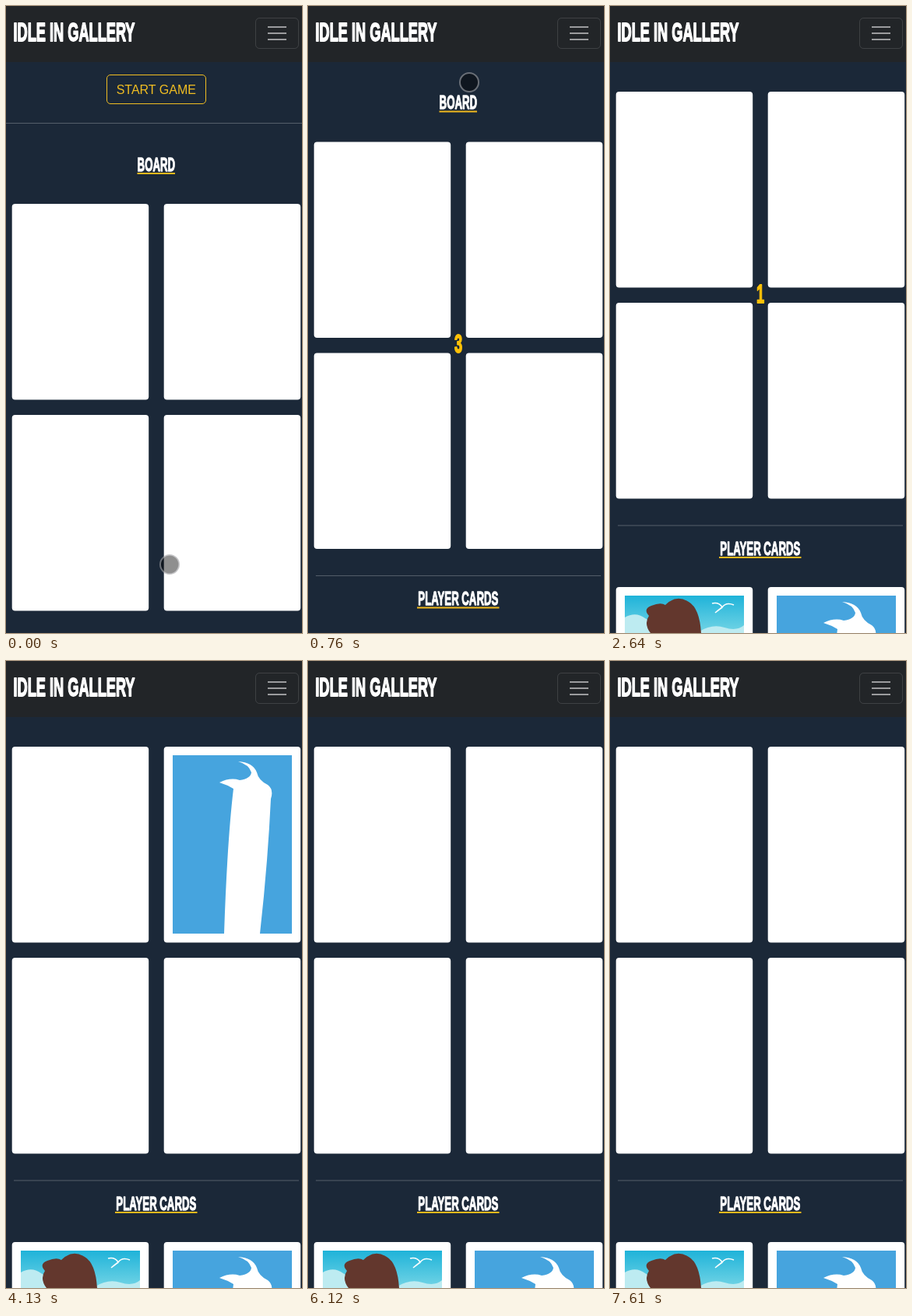
Write an HTML page that moves like this. It is 380x805 px and loops after 8 s.

```html
<!DOCTYPE html>
<html lang="en">
<head>
<meta charset="utf-8">
<title>Card game</title>
<style>
  html, body { margin: 0; width: 100%; height: 100%; overflow: hidden; background: #1b2838; }
  svg { display: block; width: 100vw; height: 100vh; }
  text { font-family: "Liberation Sans", Arial, sans-serif; }
  .head { font-weight: 700; stroke-width: .055em; stroke-linejoin: round; }
  .white { fill: #fff; stroke: #fff; }
  .gold { fill: #ffc107; stroke: #ffc107; }
</style>
</head>
<body>
<svg viewBox="0 0 380 805">
  <defs>
    <linearGradient id="sky" x1="0" y1="0" x2="0" y2="1">
      <stop offset="0" stop-color="#1fb3d9"/>
      <stop offset=".2" stop-color="#6fd3e5"/>
      <stop offset="1" stop-color="#b4e8ee"/>
    </linearGradient>
    <clipPath id="crop"><rect width="153" height="229"/></clipPath>
    <g id="sea" clip-path="url(#crop)">
      <rect width="153" height="229" fill="url(#sky)"/>
      <path d="M0 28Q14 20 26 29T54 34V60H0ZM96 46Q112 36 128 41T153 38V60H96Z" fill="#bdebf1"/>
      <path d="M33 48Q24 36 31 26Q23 17 34 13Q46 8 52 12Q66-2 82 8Q96 16 98 48Q108 120 96 229H28Q22 110 33 48Z" fill="#63372d"/>
      <path d="M112 10Q121 8 125 15Q130 8 140 12M116 22Q121 18 125 15" fill="none" stroke="#fff" stroke-width="1.6"/>
    </g>
    <g id="ink" clip-path="url(#crop)">
      <rect width="153" height="229" fill="#46a4de"/>
      <path d="M60 35Q74 28 86 32Q100 30 101 22Q98 12 84 8Q103 9 108 22Q110 32 122 38Q130 44 126 56Q122 140 112 229H66Q70 110 78 43Q70 38 60 35Z" fill="#fff"/>
    </g>
  </defs>

  <rect width="380" height="805" fill="#1b2838"/>
  <g id="page">
    <rect x="129.5" y="88.5" width="127" height="37" rx="4.5" fill="none" stroke="#f0bd22"/>
    <text x="192.8" y="112.5" font-size="16" text-anchor="middle" fill="#f0bd22">START GAME</text>
    <path d="M0 150.5H380M10 811H376" stroke="#fff" stroke-opacity=".25"/>
    <g id="titles"></g>
    <path d="M168.5 215H217M140 852H245.5" stroke="#f2b91c" stroke-width="2"/>
    <g id="cards" fill="#fff"></g>
    <g id="flashes"></g>
    <use href="#sea" x="19" y="901"/>
    <use href="#ink" x="214" y="901"/>
    <g id="counter"></g>
  </g>

  <g id="bar">
    <rect width="380" height="72" fill="#222528"/>
    <rect x="320.5" y="15.5" width="55" height="39" rx="5" fill="none" stroke="#fff" stroke-opacity=".13"/>
    <path d="M336 27H360M336 35H360M336 43H360" stroke="#fff" stroke-opacity=".55" stroke-width="2"/>
  </g>

  <g id="dot">
    <circle r="11.5" fill="#000" fill-opacity=".44"/>
    <circle r="12" fill="none" stroke="#a0a0a4" stroke-opacity=".6" stroke-width="2"/>
  </g>
</svg>
<script>
const NS = "http://www.w3.org/2000/svg";
const LOOP = 8000, STEP = 96.25, FIRST = 90;
const CONDENSE = .56;
const $ = id => document.getElementById(id);

function add(parent, tag, attrs) {
  const el = document.createElementNS(NS, tag);
  for (const k in attrs) el.setAttribute(k, attrs[k]);
  return $(parent).appendChild(el);
}

// Heading in one condensed style, shared by all titles
function heading(parent, str, x, y, size, cls, anchor = "middle") {
  const el = add(parent, "text", {
    class: "head " + cls, "font-size": size, "text-anchor": anchor,
    transform: `translate(${x} ${y}) scale(${CONDENSE} 1)`
  });
  el.textContent = str;
  return el;
}

heading("bar", "IDLE IN GALLERY", 9.5, 44.5, 32.5, "white", "start");
heading("titles", "BOARD", 192.8, 212, 23.6, "white");
heading("titles", "PLAYER CARDS", 192.8, 848.7, 23.6, "white");
const count = heading("counter", "3", 193, 525, 32.5, "gold");

const cols = [7.7, 202.7], rows = [254, 525, 890];
for (const y of rows)
  for (const x of cols) add("cards", "rect", { x, y, width: 175.5, height: 251.4, rx: 4 });

const flashes = [
  { from: 4130, to: 4630, art: "ink", col: 1, row: 0 },
  { from: 5630, to: 6120, art: "sea", col: 0, row: 1 },
  { from: 7120, to: 7610, art: "ink", col: 1, row: 1 }
];
for (const f of flashes)
  f.el = add("flashes", "use", { href: "#" + f.art, x: cols[f.col] + 11.3, y: rows[f.row] + 11 });

const clamp = v => Math.max(0, Math.min(1, v));
const smooth = v => v * v * (3 - 2 * v);
const show = (el, on) => el.setAttribute("visibility", on ? "visible" : "hidden");
const move = (el, x, y) => el.setAttribute("transform", `translate(${x} ${y})`);

function label(t) {
  if (t < 640 || t >= 4130) return "";
  return t < 1650 ? "3" : t < 2640 ? "2" : t < 3640 ? "1" : "GO!";
}

function pointer(t, q) {
  if (t >= 2345) return [340, 79];
  if (t >= 2250) return [262, 92];
  const p = smooth(clamp(q / 571));
  return [210 - 3 * p, 717 - 619 * p];
}

function draw(t) {
  // The screen refreshes in coarse steps while things move
  const k = Math.floor((t - FIRST + 5) / STEP);
  const q = k < 0 ? 0 : FIRST + k * STEP;
  const s = 1 - Math.pow(1 - clamp((q - 640) / 312), 1.59);
  move($("page"), 0, -144 * s);
  move($("dot"), ...pointer(t, q));
  show($("dot"), t < 2440);
  count.textContent = label(t);
  for (const f of flashes) show(f.el, t >= f.from && t < f.to);
}

const start = performance.now();
function tick() {
  draw((performance.now() - start) % LOOP);
  requestAnimationFrame(tick);
}
tick();
</script>
</body>
</html>
```
